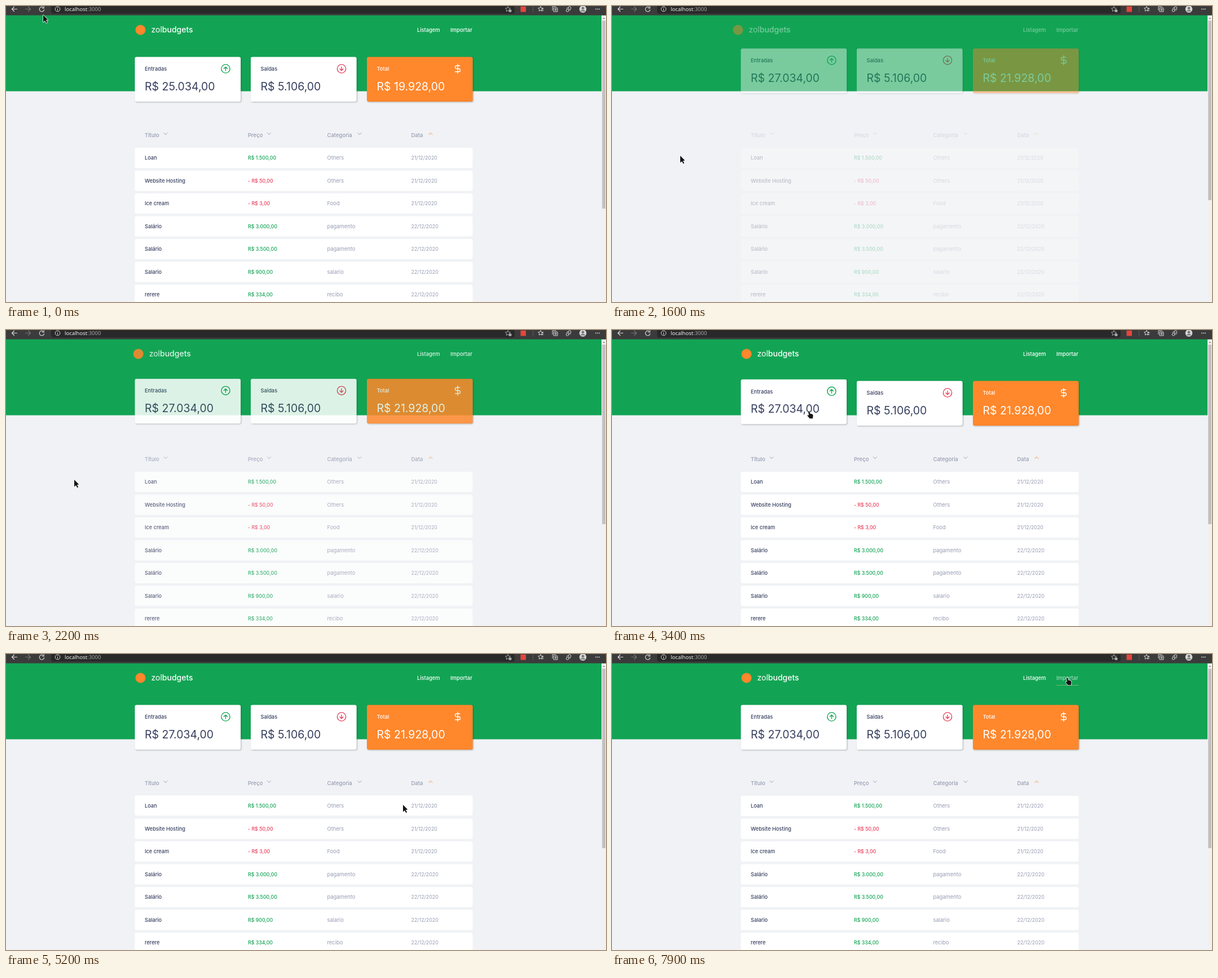
Animation, 1064 px wide and 526 px high, one loop 8 s. Source, as an HTML page with a canvas:

```html
<!DOCTYPE html>
<html lang="pt-BR">
<head>
<meta charset="utf-8">
<title>Dashboard</title>
<style>
html, body { margin: 0; width: 100%; height: 100%; overflow: hidden; background: #f0f2f5; }
canvas { display: block; }
</style>
</head>
<body>
<canvas id="stage" width="1064" height="526"></canvas>
<script>
const W = 1064, H = 526, LOOP = 8000, STEP = 100;
const GREEN = '#12a454', RED = '#e83f5b', ORANGE = '#ff872c';
const NAVY = '#363f5f', MUTED = '#969cb3', PAGE = '#f0f2f5';
const LEFT = 228.5, RIGHT = 827.5, SLIDE = 26.7;

const main = document.getElementById('stage').getContext('2d');
const buffer = document.createElement('canvas');
buffer.width = W;
buffer.height = H;
const layer = buffer.getContext('2d');
let g = main;

// Pointer keys: time, x, y
const POINTER = [
  [0, 66, 16], [300, 65, 12], [400, 64, 7], [700, 66, 12], [800, 79, 62],
  [900, 98, 155], [1000, 115, 240], [1100, 121, 266], [3400, 348, 144],
  [3700, 460, 147], [3800, 528, 145], [4000, 552, 147], [4200, 570, 146],
  [4400, 668, 145], [4500, 732, 146], [4800, 738, 148], [5200, 704, 268],
  [5700, 702, 362], [6100, 706, 423], [6500, 724, 512], [6800, 894, 426],
  [7200, 904, 95], [7500, 824, 49], [7900, 806, 42]
];
const LOADING = 500, BLANK = 1000, FILLED = 1200, FADE = 1075, FADE_TIME = 2000;

const CARDS = [[LEFT, 'Entradas'], [434, 'Saídas'], [640, 'Total']];
const COLUMNS = [
  ['Título', 246, 283], ['Preço', 429, 466.5],
  ['Categoria', 569.5, 627], ['Data', 718.5, 753]
];
const ROWS = [
  ['Loan', 'R$ 1.500,00', 'Others', 21],
  ['Website Hosting', '- R$ 50,00', 'Others', 21],
  ['Ice cream', '- R$ 3,00', 'Food', 21],
  ['Salário', 'R$ 3.000,00', 'pagamento', 22],
  ['Salário', 'R$ 3.500,00', 'pagamento', 22],
  ['Salario', 'R$ 900,00', 'salario', 22],
  ['rerere', 'R$ 334,00', 'recibo', 22]
];
const rowTop = i => 252 + 40.5 * i;

const DOLLAR = new Path2D('M12 1V23M17 5H9.5a3.5 3.5 0 0 0 0 7h5a3.5 3.5 0 0 1 0 7H6');
const ARROW = new Path2D('M0 0L8.4 8.6L4.9 9.1L7.2 13.2L5.3 14.2L3 10.1L0 12.6Z');
const HAND = new Path2D('M0 1Q1.2-.8 2.3 1L3.2 4.6L6.4 5.3Q8.8 6 8.6 8.2L8 13.2H2.6L-1.2 8.7Q-2 7 -.4 7.1L1.2 8.1Z');

function ease(t) {
  if (t <= 0) return 0;
  if (t >= 1) return 1;
  const bez = (a, b, u) => 3 * a * u * (1 - u) ** 2 + 3 * b * u * u * (1 - u) + u ** 3;
  let lo = 0, hi = 1;
  for (let i = 0; i < 24; i++) {
    const mid = (lo + hi) / 2;
    if (bez(.25, .25, mid) < t) lo = mid; else hi = mid;
  }
  return bez(.1, 1, lo);
}

function text(str, x, y, size, color, weight = 500, family = 'Inter') {
  g.font = `${weight} ${size}px ${family}, sans-serif`;
  g.fillStyle = color;
  g.fillText(str, x, y);
  return g.measureText(str).width;
}

function box(x, y, w, h, color, r = 0) {
  g.fillStyle = color;
  g.beginPath();
  g.roundRect(x, y, w, h, r);
  g.fill();
}

function disc(x, y, r, color) {
  g.fillStyle = color;
  g.beginPath();
  g.arc(x, y, r, 0, Math.PI * 2);
  g.fill();
}

function ring(x, y, r, color, width = 1, from = 0, to = Math.PI * 2) {
  g.strokeStyle = color;
  g.lineWidth = width;
  g.beginPath();
  g.arc(x, y, r, from, to);
  g.stroke();
}

function stroke(path, x, y, color, width = 1, scale = 1) {
  g.save();
  g.translate(x, y);
  g.scale(scale, scale);
  g.strokeStyle = color;
  g.lineWidth = width / scale;
  g.lineCap = g.lineJoin = 'round';
  g.stroke(typeof path === 'string' ? new Path2D(path) : path);
  g.restore();
}

function star(x, y, r, color) {
  g.strokeStyle = color;
  g.lineWidth = 1;
  g.beginPath();
  for (let i = 0; i < 10; i++) {
    const a = i * Math.PI / 5 - Math.PI / 2, d = i % 2 ? r * .48 : r;
    g.lineTo(x + d * Math.cos(a), y + d * Math.sin(a));
  }
  g.closePath();
  g.stroke();
}

// Draws as one flattened group with opacity and shift
function group(alpha, dx, dy, draw) {
  if (alpha <= 0) return;
  layer.clearRect(0, 0, W, H);
  g = layer;
  g.save();
  g.translate(dx, dy);
  draw();
  g.restore();
  g = main;
  g.globalAlpha = alpha;
  g.drawImage(buffer, 0, 0);
  g.globalAlpha = 1;
}

function shadow(on) {
  g.shadowColor = on ? 'rgba(0,0,0,.28)' : 'transparent';
  g.shadowBlur = on ? 2.5 : 0;
  g.shadowOffsetX = g.shadowOffsetY = on ? 1 : 0;
}

function toolbar(t) {
  const ink = '#dadada';
  box(0, 0, W, 16.5, '#3b3b3b');
  box(80, -6, 822, 19.5, '#292929', 4);
  stroke('M5 0H-4M0-4L-4 0L0 4', 14.5, 5.5, ink, 1.2);
  stroke('M-5 0H4M0-4L4 0L0 4', 39.5, 5.5, '#747474', 1.2);
  if (t >= 300 && t < 800) box(53, -6, 21, 19, '#4c4c4c', 3);
  if (t >= LOADING && t < FILLED - STEP) {
    stroke('M-4-4L4 4M4-4L-4 4', 63.5, 5.5, ink, 1.2);
  } else {
    ring(63.5, 5.8, 4.2, ink, 1.2, .1, 5.4);
    stroke('M3.8-4.6V-1.4H.7', 63.5, 5.4, ink, 1.1);
  }
  ring(91.5, 5.5, 4.3, ink);
  box(91, 5, 1, 3.2, ink);
  box(91, 3, 1, 1, ink);
  const w = text('localhost', 104, 9.2, 9.5, '#f4f4f4', 400, "'Noto Sans'");
  text(':3000', 104 + w, 9.2, 9.5, '#a6a6a6', 400, "'Noto Sans'");

  star(890, 5.6, 4.8, '#a8a8a8');
  disc(894, 8.5, 2.6, '#a8a8a8');
  box(912.5, 1, 9.5, 9.5, '#e5463c');
  box(934, 1, 1, 10, '#5b5b5b');
  star(948, 5.3, 4.6, ink);
  stroke('M2 0H5M2 3H5', 948, 5, ink);
  stroke('M-2-2H4.5V4.5H-2ZM-4.5 2V-4.5H2M1.2-.6V3M-.6 1.2H3', 973.5, 5.5, ink);
  ring(999.5, 3.6, 2.4, ink);
  ring(995.5, 8, 2.2, ink);
  stroke('M-3-1L0-3M2 3L4 1', 997, 5.5, ink);
  disc(1023, 5.5, 6.3, '#d6d6d6');
  disc(1023, 3.9, 2.3, '#777');
  g.fillStyle = '#777';
  g.beginPath();
  g.ellipse(1023, 9.6, 4, 2.5, 0, Math.PI, 0);
  g.fill();
  for (let i = -1; i < 2; i++) disc(1049 + i * 3, 5.5, .9, ink);
}

function scrollbar(bottom) {
  box(1056, 16.5, 8, H, '#f1f1f1');
  box(1057.2, 26, 5.8, bottom - 26, '#c1c1c1');
  g.fillStyle = '#8c8c8c';
  g.fill(new Path2D('M1058 23L1060.2 20.4L1062.4 23Z'));
}

function brand() {
  disc(238.5, 42.5, 9, ORANGE);
  const w = text('zol', 257.5, 46.5, 14, '#fff', 400);
  text('budgets', 257.5 + w, 46.5, 14, '#fff', 500);
}

function nav(hover) {
  text('Listagem', 729, 46.3, 9.3, '#fff');
  text('Importar', 788, 46.3, 9.5, hover ? 'rgba(255,255,255,.6)' : '#fff');
  if (hover) box(788, 55, 39.5, 1, '#75b970');
}

function card(i, value, lift) {
  const [x, label] = CARDS[i], y = lift ? 87.8 : 90.5, last = i === 2;
  const ink = last ? '#fff' : NAVY, ix = x + 161, iy = y + 21;
  shadow(true);
  box(x, y, 187.7, 79.5, last ? ORANGE : '#fff', 3);
  shadow(false);
  text(label, x + 17.5, y + 24.7, 9.3, ink);
  text(value, x + 17.5, y + 59.3, 19.5, ink, 400);
  if (last) {
    stroke(DOLLAR, ix - 9, iy - 9, '#fff', 1.3, .75);
  } else {
    const color = i ? RED : GREEN;
    ring(ix, iy, 7.6, color, 1.4);
    stroke(i ? 'M0-3.2V3.2M-3 .3L0 3.2L3 .3' : 'M0 3.2V-3.2M-3-.3L0-3.2L3-.3', ix, iy, color, 1.4);
  }
}

function table(hoverRow) {
  COLUMNS.forEach(([label, x, mark], i) => {
    text(label, x, 232.7, 9.5, MUTED);
    if (i < 3) stroke('M-3-1.5L0 1.5L3-1.5', mark, 227, MUTED);
    else stroke('M-3 1.5L0-1.5L3 1.5', mark, 227, ORANGE);
  });
  ROWS.forEach(([name, price, kind, day], i) => {
    const y = rowTop(i) - (i === hoverRow ? .8 : 0), base = y + 21.3;
    box(LEFT, y, RIGHT - LEFT, 36, '#fff', 3);
    text(name, 246, base, 9.2, NAVY);
    text(price, 429, base, 8.8, price[0] === '-' ? RED : GREEN);
    text(kind, 569.5, base, 9.4, MUTED, 400);
    text(day + '/12/2020', 718.5, base, 8.9, MUTED, 400);
  });
}

function pointer(x, y, hand) {
  const shape = hand ? HAND : ARROW;
  stroke(shape, x, y, 'rgba(255,255,255,.85)', 1.6);
  g.save();
  g.translate(x, y);
  g.fillStyle = '#151515';
  g.fill(shape);
  g.restore();
}

function render(t) {
  const [, x, y] = POINTER.filter(k => k[0] <= t).pop();
  const onCard = y > 88 && y < 170 ? CARDS.findIndex(c => x >= c[0] && x <= c[0] + 188) : -1;
  const onRow = x > LEFT && x < RIGHT ? ROWS.findIndex((r, i) => y >= rowTop(i) && y < rowTop(i) + 36) : -1;
  const onLink = x >= 788 && x <= 828 && y >= 35 && y < 49;

  const old = t < BLANK;
  const values = old
    ? ['R$ 25.034,00', 'R$ 5.106,00', 'R$ 19.928,00']
    : ['R$ 27.034,00', 'R$ 5.106,00', 'R$ 21.928,00'];
  // The fade rests just short of its end until the pointer moves again
  const clock = t < 3400 ? Math.min(t, 2600) : t;
  const p = old ? 1 : ease((clock - FADE) / FADE_TIME);
  const shift = -(1 - p) * SLIDE;

  box(0, 0, W, H, PAGE);
  box(0, 16, W, 135.5, GREEN);
  group(p, shift, 0, brand);
  group(p, 0, 0, () => nav(onLink));
  group(p, 0, shift, () => values.forEach((v, i) => card(i, v, i === onCard)));
  group(p ** 1.5, 0, 0, () => table(onRow));
  if (old || t >= FILLED) scrollbar(old ? 360 : 345);
  toolbar(t);
  pointer(x, y, onCard >= 0 || onLink);
}

function tick() {
  const t = performance.now() % LOOP;
  render(Math.floor(t / STEP) * STEP);
  requestAnimationFrame(tick);
}
tick();
</script>
</body>
</html>
```
